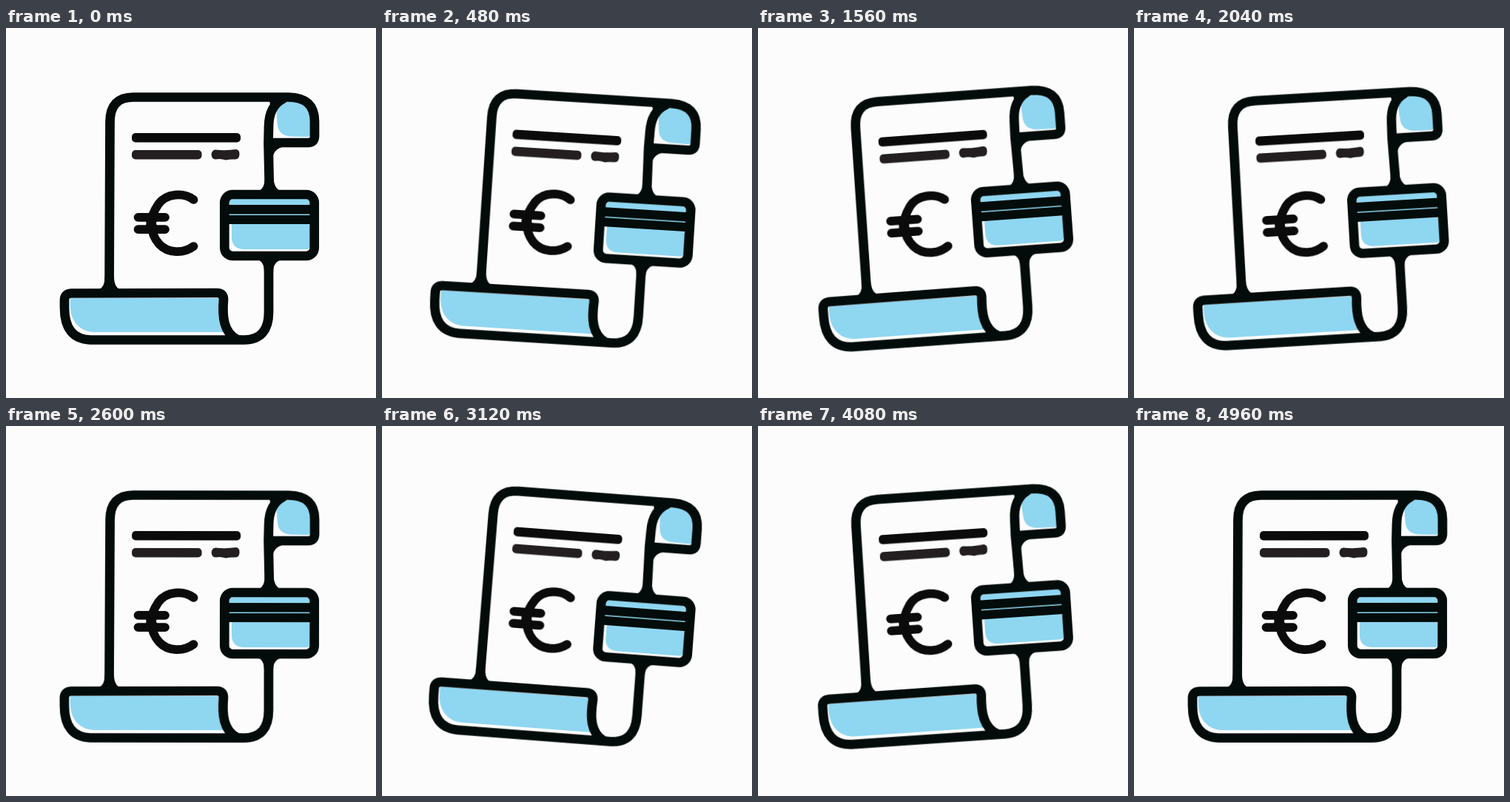
An HTML page for the animation above (5 s loop, 500 by 500 pixels).

```html
<!DOCTYPE html>
<html lang="en">
<head>
<meta charset="utf-8">
<title>Invoice</title>
<style>
  html, body { margin: 0; width: 100%; height: 100%; overflow: hidden; background: #fcfcfc; }
  svg { display: block; width: 100vw; height: 100vh; }
  .invoice {
    transform-origin: 250px 250px;
    animation: sway 5000ms cubic-bezier(.37, 0, .63, 1) infinite;
  }
  /* two swings with a short rest between them */
  @keyframes sway {
    0%, 50%, 51%, 100% { transform: rotate(0deg); }
    15%, 66% { transform: rotate(5deg); }
    35%, 86% { transform: rotate(-5deg); }
  }
  .line { fill: none; stroke: #030c0a; stroke-width: 12.7; stroke-linecap: round; stroke-linejoin: round; }
  .ink { fill: #030c0a; }
  .blue { fill: #8fd6f1; }
  .text { fill: #0b0b0b; }
  .soft { fill: #231f20; }
  .euro { fill: none; stroke: #0b0b0b; stroke-width: 11.7; stroke-linecap: round; stroke-linejoin: round; }
</style>
</head>
<body>
<svg viewBox="0 0 500 500">
  <g class="invoice">
    <!-- tinted areas -->
    <path class="blue" d="M369 101Q385 97 399 102Q412 109 412 125V142Q412 147 407 147L384 146.500Q369 145 367 132Q365 115 366 108Z"/>
    <path class="blue" d="M87 365H288Q288 393 294 411H118Q96 409 89 389Q86 380 87 365Z"/>

    <!-- scroll -->
    <path class="line" d="M139.500 357L140.500 127Q140.500 93.500 172 93.500H382Q417 94 417 126V146Q417 155 408 155H356"/>
    <path class="line" d="M374 96Q355 106 355 134L354.500 155L356 222"/>
    <path class="line" d="M355 312V384Q355 421 322 421.500H114Q79 420 79 378V368Q79 359 88 358.500L285 358Q294 358 294 367C292 390 294 411 312 421"/>

    <!-- fillets at the joints -->
    <g class="ink">
      <path d="M122 354Q133.500 353 133.500 336H146Q146 352 157 354Z"/>
      <path d="M339 221Q350 219 350 200H361Q362 219 374 221Z"/>
      <path d="M339 313Q349 315 349 330H361Q361 315 374 313Z"/>
      <path d="M360 180Q360 162 378 160L350 150Z"/>
      <path d="M356 98H382Q366 102 360 120Z"/>
      <path d="M303 402Q308 415 320 416L310 420Z"/>
    </g>

    <!-- card -->
    <rect x="295" y="225" width="122" height="83" rx="11" fill="#fcfcfc"/>
    <path class="blue" d="M302 239V235Q303 231 308 231H406Q411 231 411 236V239Z"/>
    <path class="blue" d="M305 265H408Q411 265 411 268V294Q411 299 406 299H322Q306 299 305 284Z"/>
    <rect class="ink" x="297" y="239" width="118" height="26"/>
    <rect class="blue" x="301" y="251.500" width="110" height="1.500"/>
    <rect class="line" x="295.300" y="225" width="121.400" height="83" rx="11"/>

    <!-- printed lines -->
    <rect class="text" x="170" y="142" width="147" height="12.400" rx="5"/>
    <rect class="soft" x="170" y="165" width="94.500" height="12.400" rx="5"/>
    <path class="soft" d="M283 164.500Q297 166 311 164Q316 165 315.500 171Q315 178 309 177.500Q302 177 297 178.500Q290 176 283 177.500Q278 177 277.500 171Q278 165 283 164.500Z"/>

    <!-- euro sign -->
    <path class="euro" d="M253.500 232C240 222 217 223 206 238Q196 253 196 264Q197 281 207 292C219 305 240 305 253.500 295"/>
    <path class="euro" d="M178.500 255.800H215M178.500 272.200H215"/>
    <path class="text" d="M188 259Q191 264 188 269H206Q200 264 206 259Z"/>
  </g>
</svg>
</body>
</html>
```
